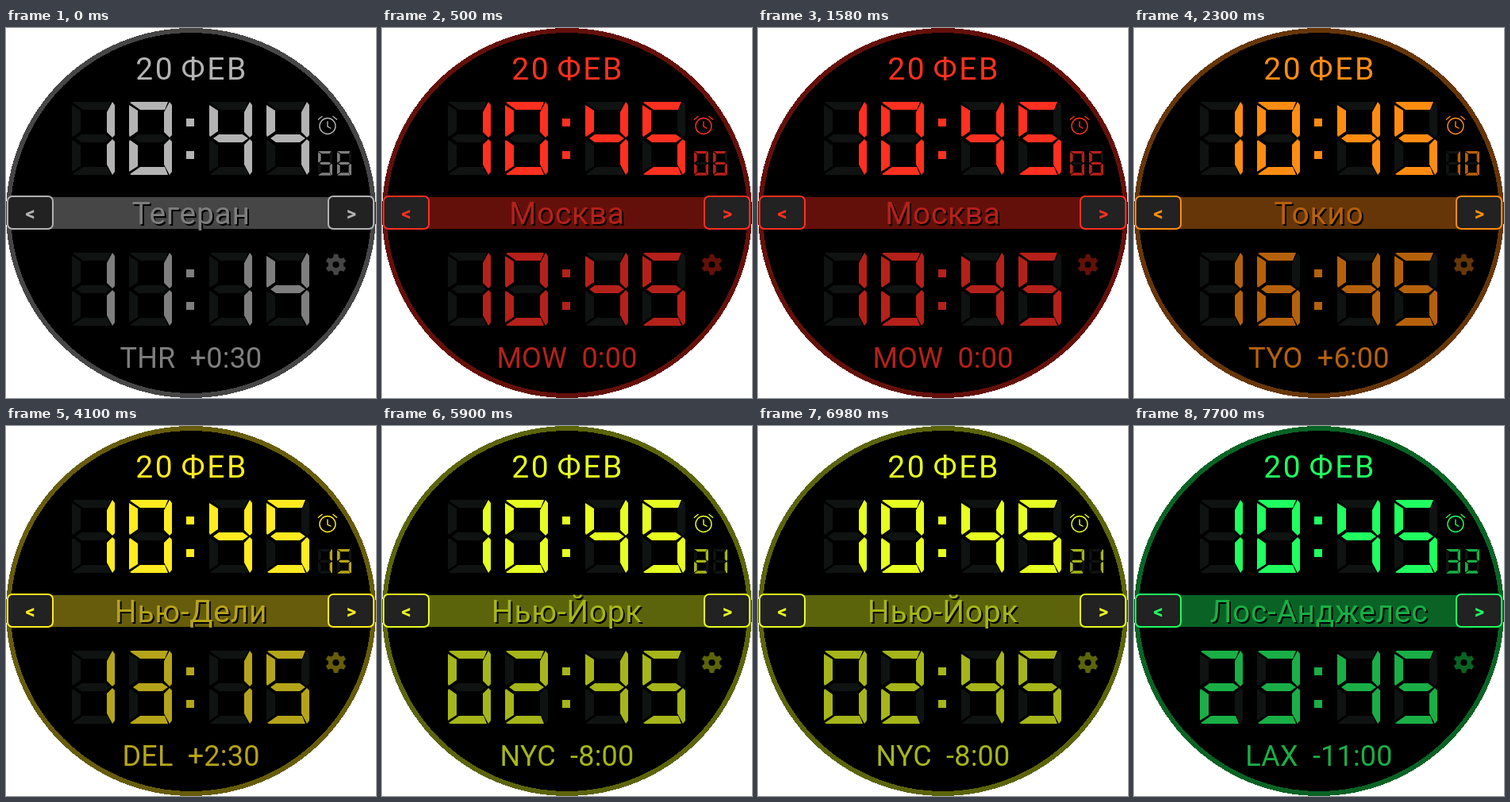
An HTML page that plays this animation: 466 px wide and 466 px high, repeating every 8000 ms.

```html
<!DOCTYPE html>
<html lang="ru">
<head>
<meta charset="utf-8">
<title>World clock</title>
<style>
  html, body { margin: 0; width: 100%; height: 100%; overflow: hidden; background: #fff; }
  svg { display: block; width: 100vw; height: 100vh; }
  text { font-family: Roboto, "Noto Sans", sans-serif; text-anchor: middle; white-space: pre; }
  .hi { fill: var(--hi); }
  .mid { fill: var(--mid); }
  .low { fill: var(--low); }
  .off { fill: #0f1311; }
  .line { fill: none; stroke: var(--hi); }
  .city { font-size: 39px; letter-spacing: .7px; }
  .date { font-size: 39px; letter-spacing: 2.6px; word-spacing: -4px; }
  .zone { font-size: 36px; letter-spacing: .2px; }
  .arrow { font-size: 24px; font-weight: 700; }
</style>
</head>
<body>
<svg id="face" viewBox="0 0 466 466">
  <g shape-rendering="crispEdges">
    <circle class="low" cx="233" cy="233" r="233"/>
    <circle cx="233" cy="233" r="227"/>
    <rect class="low" x="2" y="213" width="462" height="40"/>
  </g>

  <text class="date hi" x="234" y="65">20 ФЕВ</text>
  <text class="city" id="shade" x="235" y="249"></text>
  <text class="city mid" id="city" x="233" y="247"></text>
  <text class="zone mid" id="zone" x="233" y="428"></text>

  <g fill="#222" stroke="var(--hi)" stroke-width="2">
    <rect x="2" y="212" width="57" height="41" rx="6"/>
    <rect x="406" y="212" width="57" height="41" rx="6"/>
  </g>
  <text class="arrow hi" x="30.5" y="242">&lt;</text>
  <text class="arrow hi" x="435" y="242">&gt;</text>

  <g class="line" stroke-width="1.4">
    <circle cx="405" cy="123.5" r="10"/>
    <path d="M405 117.5V124L409.500 126.5M393 115.500L398.500 111M417 115.500L411.500 111"/>
  </g>

  <g id="gear" transform="translate(415.5 298)">
    <circle r="6.900" fill="none" stroke="var(--low)" stroke-width="5.600"/>
  </g>
</svg>
<script>
const NS = "http://www.w3.org/2000/svg";
const face = document.getElementById("face");
const byId = id => document.getElementById(id);

function add(parent, tag, attrs) {
  const node = document.createElementNS(NS, tag);
  for (const key in attrs) node.setAttribute(key, attrs[key]);
  return parent.appendChild(node);
}

// Segment outlines a to g in a 54 by 92 cell
const SEGMENTS = [
  "1,1 3,0 49,0 45,10 14,10",
  "51,0 54,4 54,42 51,45 44,38 44,13",
  "51,47 54,50 54,88 51,92 44,79 44,54",
  "14,82 45,82 49,92 3,92 1,91",
  "0,50 1,48 11,55 11,81 0,88",
  "0,4 11,11 11,37 1,44 0,42",
  "5,46 12,41 42,41 49,46 42,51 12,51"
];
const LIT = ["abcdef", "bc", "abdeg", "abcdg", "bcfg", "acdfg", "acdefg", "abc", "abcdefg", "abcdfg"];

function makeDigit(x, y, scale) {
  const cell = add(face, "g", { transform: `translate(${x} ${y}) scale(${scale})` });
  return SEGMENTS.map(points => add(cell, "polygon", { points }));
}

function makeRow(xs, y, scale, tone) {
  const digits = xs.map(x => makeDigit(x, y, scale));
  return value => digits.forEach((segments, i) => {
    const lit = LIT[value[i]];
    segments.forEach((s, k) => s.setAttribute("class", lit.includes("abcdefg"[k]) ? tone : "off"));
  });
}

function makeColon(y, tone) {
  for (const dy of [21, 62])
    add(face, "rect", { x: 227, y: y + dy, width: 10, height: 10, class: tone });
}

const columns = [83, 155, 256, 328];
const showLocal = makeRow(columns, 93, 1, "hi");
const showRemote = makeRow(columns, 283, 1, "mid");
const showSeconds = makeRow([393, 417], 155, 1 / 3, "mid");
makeColon(93, "hi");
makeColon(283, "mid");

for (let a = 0; a < 360; a += 60)
  add(byId("gear"), "path", { d: "M-3.700 -8L-2.600 -13H2.600L3.700 -8Z", class: "low", transform: `rotate(${a})` });

const LOOP = 8000;
const STATES = [
  { at: 0, local: "1044", sec: "56", city: "Тегеран", remote: "1114", zone: "THR  +0:30", colors: ["#b3b3b3", "#7e7e7e", "#464646"] },
  { at: 500, local: "1045", sec: "06", city: "Москва", remote: "1045", zone: "MOW  0:00", colors: ["#ff3020", "#b4211a", "#64100a"] },
  { at: 2300, local: "1045", sec: "10", city: "Токио", remote: "1645", zone: "TYO  +6:00", colors: ["#ff8c12", "#b5610c", "#663609"] },
  { at: 4100, local: "1045", sec: "15", city: "Нью-Дели", remote: "1315", zone: "DEL  +2:30", colors: ["#ffeb20", "#b5a41a", "#665c0b"] },
  { at: 5900, local: "1045", sec: "21", city: "Нью-Йорк", remote: "0245", zone: "NYC  -8:00", colors: ["#e6ff20", "#a5b51a", "#5c640b"] },
  { at: 7700, local: "1045", sec: "32", city: "Лос-Анджелес", remote: "2345", zone: "LAX  -11:00", colors: ["#20ff60", "#1aae46", "#0a6325"] }
];

let shown;
function draw(time) {
  const state = STATES.findLast(s => s.at <= time % LOOP);
  if (state === shown) return;
  shown = state;
  ["--hi", "--mid", "--low"].forEach((name, i) => face.style.setProperty(name, state.colors[i]));
  showLocal(state.local);
  showRemote(state.remote);
  showSeconds(state.sec);
  byId("city").textContent = byId("shade").textContent = state.city;
  byId("zone").textContent = state.zone;
}

const start = performance.now();
function tick() {
  draw(performance.now() - start);
  requestAnimationFrame(tick);
}
tick();
</script>
</body>
</html>
```
